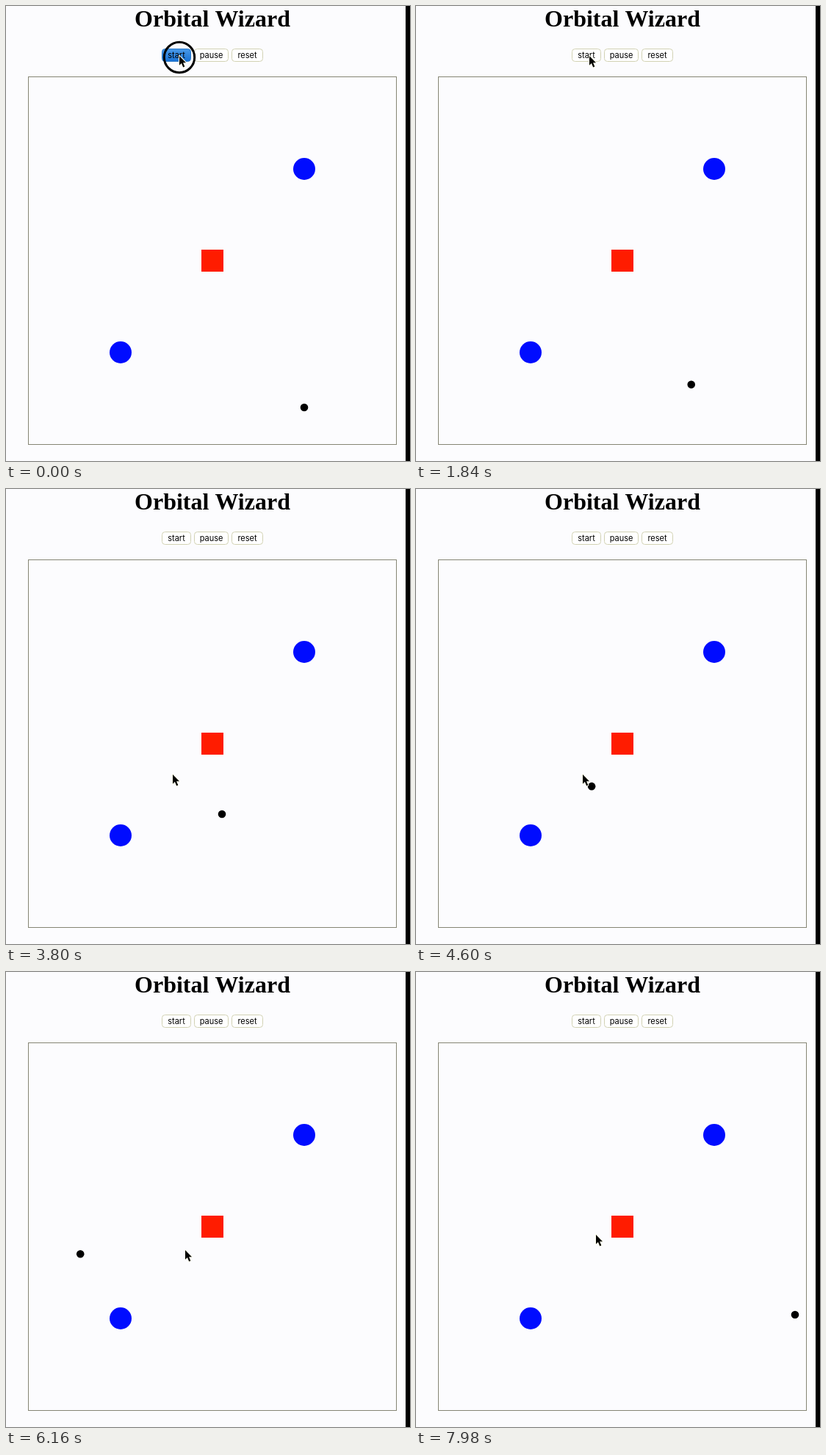
These frames come from a looping animation (550x620 px, 8000 ms). An HTML page with a canvas:

```html
<!DOCTYPE html>
<html lang="en">
<head>
<meta charset="utf-8">
<title>Orbital Wizard</title>
<style>
html, body { margin: 0; width: 100%; height: 100%; overflow: hidden; background: #fcfcfe; }
canvas { display: block; }
</style>
</head>
<body>
<canvas id="stage" width="550" height="620"></canvas>
<script>
const ctx = document.getElementById('stage').getContext('2d');
const LOOP = 8000;
const FIELD = { x: 31, y: 97, size: 500 };
const RELEASE = 0.28;

// Key points of the fall past the lower planet; x is unwrapped.
const fall = [
  { t: RELEASE, x: 406, y: 547 },
  { t: 1.587, x: 382, y: 523 },
  { t: 2.613, x: 351, y: 493 },
  { t: 3.827, x: 294, y: 443 },
  { t: 5.273, x: 180, y: 380 },
  { t: 6.273, x: 92.7, y: 387 },
  { t: 7.093, x: 44.5, y: 420.5 },
  { t: 7.98, x: 16, y: 467 }
];
const buttons = [
  { label: 'start', x: 212, w: 40 },
  { label: 'pause', x: 256, w: 47 },
  { label: 'reset', x: 307, w: 43 }
];

// Three pictures per 140 ms, shown for 20, 100 and 20 ms; the motion itself is even.
function motionTime(ms) {
  const phase = ms % 140;
  const step = phase < 20 ? 0 : phase < 120 ? 1 : 2;
  return (Math.floor(ms / 140) * 3 + step) * 140 / 3000;
}

function slope(keys, i, axis) {
  return (keys[i + 1][axis] - keys[i][axis]) / (keys[i + 1].t - keys[i].t);
}

// Tangent of the parabola through three neighbouring keys; the ends are left free.
function tangent(keys, i, axis) {
  const last = keys.length - 1;
  if (i === 0) return (3 * slope(keys, 0, axis) - tangent(keys, 1, axis)) / 2;
  if (i === last) return (3 * slope(keys, last - 1, axis) - tangent(keys, last - 1, axis)) / 2;
  const before = keys[i].t - keys[i - 1].t;
  const after = keys[i + 1].t - keys[i].t;
  return (slope(keys, i - 1, axis) * after + slope(keys, i, axis) * before) / (before + after);
}

function progress(t, from, to) {
  return Math.min(1, Math.max(0, (t - from) / (to - from)));
}

function spline(keys, t, axis) {
  let i = 0;
  while (i < keys.length - 2 && t > keys[i + 1].t) i++;
  const a = keys[i], b = keys[i + 1];
  const u = progress(t, a.t, b.t), v = 1 - u, span = b.t - a.t;
  return a[axis] * (1 + 2 * u) * v * v + b[axis] * u * u * (3 - 2 * u) +
    span * u * v * (tangent(keys, i, axis) * v - tangent(keys, i + 1, axis) * u);
}

function ease(t, from, to) {
  const u = progress(t, from, to);
  return u * u * (3 - 2 * u);
}

function disc(x, y, r, color) {
  ctx.fillStyle = color;
  ctx.beginPath();
  ctx.arc(x, y, r, 0, Math.PI * 2);
  ctx.fill();
}

function drawTitle() {
  ctx.fillStyle = '#000';
  ctx.font = 'bold 32px "Liberation Serif", serif';
  ctx.fillText('Orbital Wizard', 281, 28);
}

function drawButton({ label, x, w }, pressed) {
  ctx.beginPath();
  ctx.roundRect(x + 0.5, 58.5, w - 1, 17, 4);
  if (pressed) {
    const fill = ctx.createLinearGradient(0, 58, 0, 76);
    fill.addColorStop(0, '#4a9ae8');
    fill.addColorStop(1, '#1670d4');
    ctx.fillStyle = fill;
  } else {
    ctx.fillStyle = '#fff';
  }
  ctx.fill();
  ctx.lineWidth = 1;
  ctx.strokeStyle = pressed ? '#2a78c8' : '#d2d2b4';
  ctx.stroke();
  ctx.fillStyle = '#000';
  ctx.font = '11px Inter, sans-serif';
  ctx.fillText(label, x + w / 2, 71);
}

function drawField(t) {
  const { x, y, size } = FIELD;
  ctx.lineWidth = 1;
  ctx.strokeStyle = '#858574';
  ctx.strokeRect(x - 0.5, y - 0.5, size + 1, size + 1);
  disc(406, 222, 15, '#000cff');
  disc(156, 472, 15, '#000cff');
  ctx.fillStyle = '#ff1c00';
  ctx.fillRect(266, 332, 30, 30);

  const bx = spline(fall, t, 'x');
  ctx.save();
  ctx.beginPath();
  ctx.rect(x, y, size, size);
  ctx.clip();
  disc(bx < x ? bx + size : bx, spline(fall, t, 'y'), 5.3, '#000');
  ctx.restore();
}

function drawCursor(t) {
  const down = ease(t, 2.45, 3.28);
  const aside = ease(t, 4.9, 5.25);
  const up = ease(t, 7.4, 7.9);
  ctx.save();
  ctx.translate(
    Math.round(236 - 9 * down + 17 * aside + up),
    Math.round(68 + 321 * down - 10 * aside - 21 * up));
  ctx.beginPath();
  [[0, 0], [0, 12.8], [2.9, 10], [5.2, 15.4], [7.3, 14.5], [5.1, 9.3], [9, 9.3]]
    .forEach(([px, py]) => ctx.lineTo(px, py));
  ctx.closePath();
  ctx.lineJoin = 'round';
  ctx.lineWidth = 2;
  ctx.strokeStyle = '#fffff0';
  ctx.stroke();
  ctx.fillStyle = '#000';
  ctx.fill();
  ctx.restore();
}

function drawRing() {
  ctx.beginPath();
  ctx.arc(236, 70, 20.7, 0, Math.PI * 2);
  ctx.lineWidth = 3;
  ctx.strokeStyle = '#000';
  ctx.stroke();
}

function draw(ms) {
  const t = motionTime(ms);
  const pressed = t < RELEASE;
  ctx.fillStyle = '#fcfcfe';
  ctx.fillRect(0, 0, 550, 620);
  ctx.textAlign = 'center';
  drawTitle();
  buttons.forEach((b, i) => drawButton(b, pressed && i === 0));
  drawField(t);
  if (pressed) drawRing();
  drawCursor(t);
  ctx.fillStyle = '#000';
  ctx.fillRect(544, 0, 6, 620);
}

const start = performance.now();
function tick() {
  draw((performance.now() - start) % LOOP);
  requestAnimationFrame(tick);
}
tick();
</script>
</body>
</html>
```
